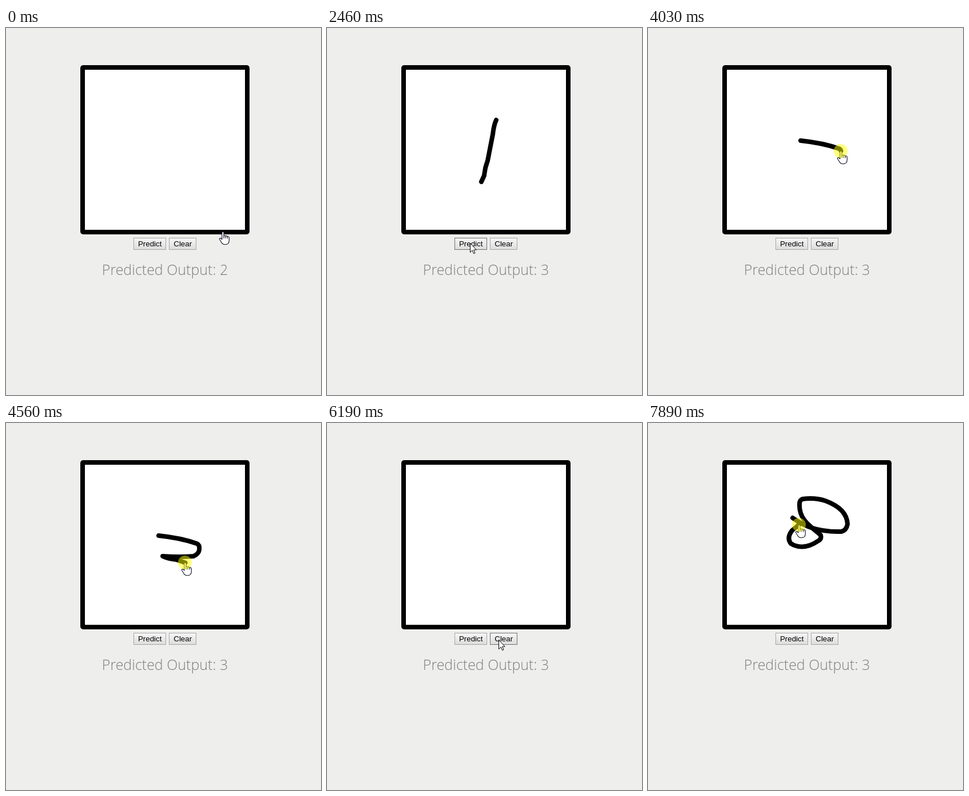
Recreate the animation shown at these times as an HTML page. Size 551x642 px, loop 8 s.

```html
<!DOCTYPE html>
<html lang="en">
<head>
<meta charset="utf-8">
<title>Digit prediction</title>
<style>
  html, body { margin: 0; width: 100%; height: 100%; overflow: hidden; background: #eeeeec; }
  svg { display: block; width: 551px; height: 642px; }
  .label { font: 13.333px "Liberation Sans", Arial, sans-serif; text-anchor: middle; }
  .ink { fill: none; stroke: #000; stroke-width: 8; stroke-linecap: round; stroke-linejoin: round; }
  #output { font: 300 25px "Open Sans", sans-serif; text-anchor: middle; fill: #7e7e7b; }
</style>
</head>
<body>
<svg viewBox="0 0 551 642">
  <defs>
    <linearGradient id="up" x2="0" y2="1"><stop stop-color="#f6f6f6"/><stop offset="1" stop-color="#dddddd"/></linearGradient>
    <linearGradient id="down" x2="0" y2="1"><stop stop-color="#dddddd"/><stop offset="1" stop-color="#f6f6f6"/></linearGradient>
  </defs>
  <rect width="551" height="642" fill="#eeeeec"/>
  <rect x="134" y="69" width="288" height="288" rx="1" fill="#fff" stroke="#000" stroke-width="8"/>
  <path class="ink" id="one" d="M296 161Q292 169 290 186L281 232Q276 245 275 258L270 269"/>
  <path class="ink" id="two" d="M267 197Q306 201 334 211Q339 213 338 222Q337 229 328 233Q303 235 274 233Q284 238 298 239L318 246Q330 252 354 254"/>
  <path class="ink" id="eight" d="M253 166Q270 178 285 183Q310 191 338 190Q347 188 349 177Q348 150 310 136Q292 130 270 133Q265 135 265 142C264 168 282 179 302 196Q304 203 298 206C278 220 262 218 250 211Q242 201 252 188L264 178"/>
  <rect id="predict" x="223.5" y="367.5" width="56" height="20"/>
  <text class="label" x="251.7" y="382">Predict</text>
  <rect id="clear" x="285.5" y="367.5" width="47" height="20"/>
  <text class="label" x="309.2" y="382">Clear</text>
  <text id="output" x="278" y="432"></text>
  <g id="cursor" fill="#fff" stroke-linejoin="round">
    <path id="hand" stroke="#0a0f24" stroke-width="1.1" d="M-1.2 14V2C-1.2 0 2 0 2 2V8.500C2 6.500 5 6.500 5 8.500C5 7.200 8.200 7.200 8.200 9.500C8.400 8.300 11.300 8.300 11.300 11V15.500C11.300 20.500 8.800 22.800 4.500 22.800C.5 22.800 -1.500 20.500 -2.600 18.200L-5.400 13.800C-6.200 12 -4 10.800 -2.600 12.400ZM2 8.500V12M5 8.500V12M8.200 9.500V12.500"/>
    <path id="arrow" stroke="#000" d="M.5.5V16.500L4.200 13L6.700 18.600L9 17.600L6.600 12.100H11.300Z"/>
  </g>
  <circle id="halo" r="12" fill="#ff0" fill-opacity=".5"/>
</svg>
<script>
const LOOP = 8000, STEP = 77.4, PHASE = 58;
const $ = id => document.getElementById(id);
const mix = (a, b, k) => a + (b - a) * k;
const smooth = k => k * k * (3 - 2 * k);

// A pen stroke: [time, share drawn] keys, and when the pad is wiped
function draw(id, wipe, ...keys) {
  const path = $(id), length = path.getTotalLength();
  const from = keys[0][0], to = keys[keys.length - 1][0];
  const drawn = t => {
    const i = Math.max(1, keys.findIndex(k => k[0] >= t));
    const [a, p] = keys[i - 1], [b, q] = keys[i];
    return length * mix(p, q, Math.max(0, (t - a) / (b - a)));
  };
  return {
    from, to, path, wipe,
    length: t => drawn(Math.min(t, to)),
    at(t) {
      const { x, y } = path.getPointAtLength(this.length(t));
      return [x, y];
    },
    pressed: () => true
  };
}

// The pointer resting on a spot, with an optional press
const rest = (from, to, x, y, down, up) => ({
  from, to, at: () => [x, y], pressed: t => t >= down && t < up
});

const acts = [
  rest(0, 0, 379, 356),
  draw("one", 3305, [440, 0], [830, 1]),
  rest(1290, 2420, 250, 376, 1520, 1680),
  rest(3100, 3305, 298, 376, 3150, 3305),
  draw("two", 6170, [3755, 0], [4390, 0.8], [4550, 0.82], [4700, 1], [4850, 1]),
  rest(5310, 5620, 258, 371, 5470, 5550),
  rest(5870, 6170, 300, 379, 6090, 6170),
  draw("eight", LOOP, [6940, 0], [7710, 0.91], [7870, 1], [LOOP, 1])
];
const strokes = acts.filter(a => a.path);

function pointer(t) {
  const i = acts.findIndex(a => t <= a.to), act = acts[i];
  if (t >= act.from) return [...act.at(t), act.pressed(t)];
  const last = acts[i - 1], a = last.at(last.to), b = act.at(act.from);
  const k = smooth((t - last.to) / (act.from - last.to));
  return [mix(a[0], b[0], k), mix(a[1], b[1], k), false];
}

function drawButton(id, left, right, x, y, pressed) {
  const over = x >= left && x < right && y >= 367 && y < 388;
  $(id).setAttribute("fill", over && pressed ? "url(#down)" : "url(#up)");
  $(id).setAttribute("stroke", over ? "#707070" : "#a6a6a6");
}

const show = (el, on) => { el.style.visibility = on ? "visible" : "hidden"; };

function render(time) {
  const t = Math.max(0, PHASE + Math.floor((time - PHASE) / STEP) * STEP);
  const [x, y, pressed] = pointer(t);

  for (const s of strokes) {
    const on = t >= s.from && t < s.wipe;
    show(s.path, on);
    if (on) s.path.setAttribute("stroke-dasharray", `${s.length(t) + 0.01} 2000`);
  }
  drawButton("predict", 223, 280, x, y, pressed);
  drawButton("clear", 285, 333, x, y, pressed);
  $("output").textContent = "Predicted Output: " + (t < 1680 ? 2 : 3);

  const place = `translate(${Math.round(x)} ${Math.round(y)})`;
  const onPad = y < 361 && x > 130 && x < 426;
  $("cursor").setAttribute("transform", place);
  $("halo").setAttribute("transform", place);
  show($("hand"), onPad);
  show($("arrow"), !onPad);
  show($("halo"), pressed);
}

const start = performance.now();
function loop() {
  render((performance.now() - start) % LOOP);
  requestAnimationFrame(loop);
}
loop();
</script>
</body>
</html>
```
